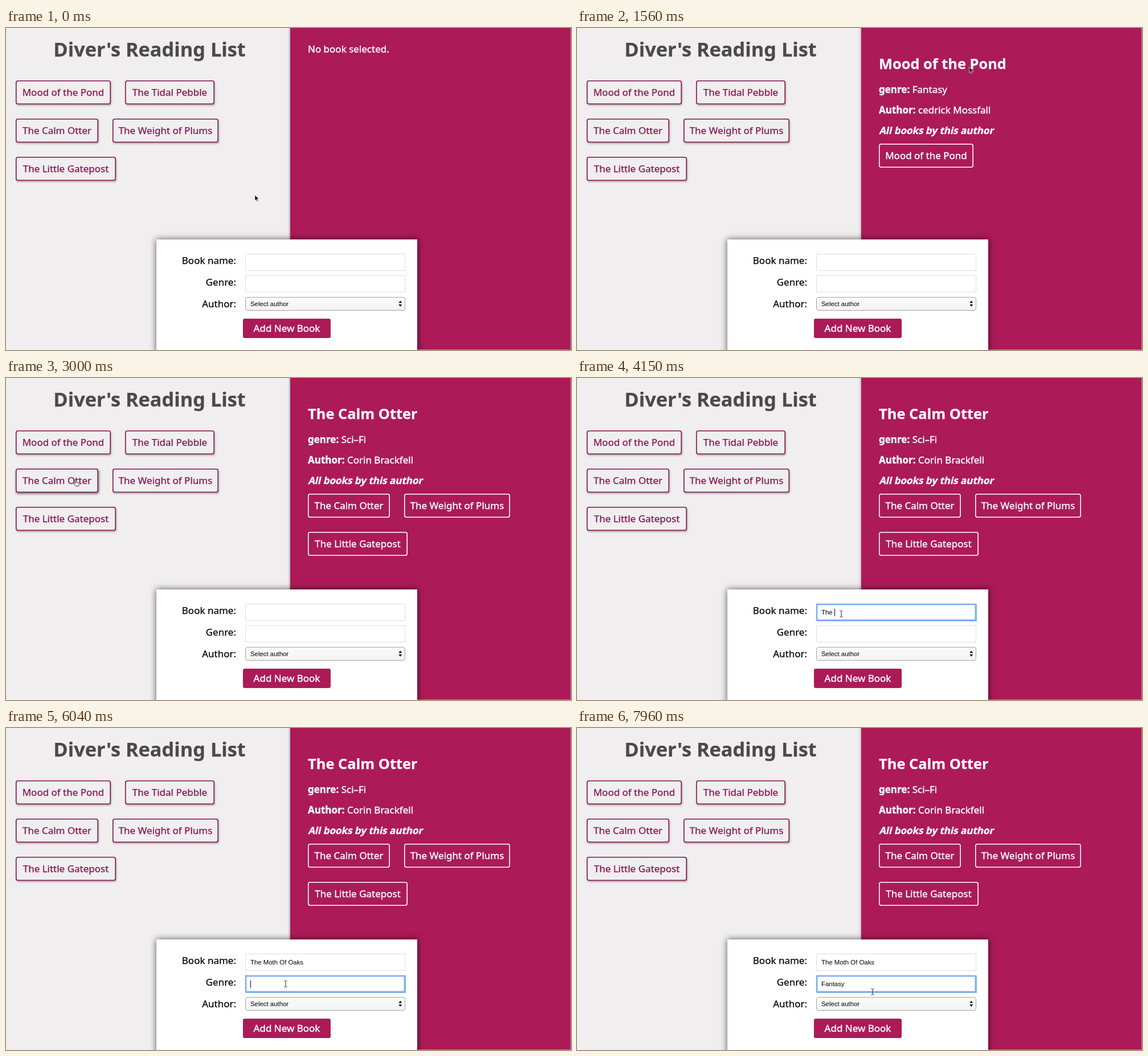
An HTML page for the animation above (8 s loop, 992x565 px).

```html
<!DOCTYPE html>
<html lang="en">
<head>
<meta charset="utf-8">
<title>Reading list</title>
<style>
  html, body { margin: 0; width: 100%; height: 100%; overflow: hidden; }
  body { position: relative; background: #f0eeef; font: 17px/24px "Noto Sans", "Open Sans", sans-serif; color: #000; -webkit-text-stroke: .25px; }
  body * { position: absolute; box-sizing: border-box; white-space: nowrap; margin: 0; }
  b, .value, .caret { position: static !important; }
  h1 { left: 0; width: 504px; top: 17px; font-size: 34.3px; line-height: 40px; text-align: center; color: #4a4a4a; }
  #details { left: 499px; top: 0; width: 493px; height: 565px; background: #ac1a58; color: #fff; box-shadow: -1px -2px 4px rgba(0,0,0,.3), inset -1px -1px rgba(255,255,255,.4); }
  #details p { left: 31px; }
  h2 { left: 31px; top: 44px; font-size: 25.4px; line-height: 36px; }
  .all { top: 168px; font-weight: bold; transform: skewX(-13deg); transform-origin: 0 18.6px; }
  .book { height: 42px; line-height: 42px; border-radius: 4px; text-align: center; box-shadow: inset 0 0 0 1.6px; }
  #list .book { color: #85124f; box-shadow: inset 0 0 0 1.6px, 1px 2px 3px rgba(0,0,0,.3); }
  #list .book.hover { box-shadow: inset 0 0 0 1.6px, 1px 2px 4px rgba(0,0,0,.6); }
  #form { left: 264px; top: 371px; width: 458px; height: 220px; background: #fff; box-shadow: 0 0 11px rgba(0,0,0,.65); }
  label { right: 318px; }
  .field { left: 156px; width: 281px; height: 30px; padding-left: 8px; border: 1px solid #ddd; font: 11.4px/29px "Liberation Sans", Arial, sans-serif; white-space: pre; -webkit-text-stroke: 0; }
  .field.focus { border-color: #76a9f3; box-shadow: -.5px -.5px 1px 1px #8ab6f7, inset 0 0 0 1.5px #86b4f5; }
  .value { white-space: pre; }
  .caret { display: inline-block; width: 1px; height: 13px; margin-right: -1px; vertical-align: -3px; background: #000; visibility: hidden; }
  #select { top: 101px; height: 24px; line-height: 22px; border-color: #a3a3a3; border-radius: 4px; background: linear-gradient(#fafafa, #f4f4f4); }
  #select svg { left: 268px; top: 5px; }
  #add { left: 152px; top: 139px; width: 154px; height: 34px; line-height: 34px; border-radius: 3px; background: #ac1a58; color: #fff; text-align: center; }
  #details p, #add, #details .book { -webkit-text-stroke-width: .4px; }
  #pointer { left: 0; top: 0; overflow: visible; }
</style>
</head>
<body>
<h1>Diver's Reading List</h1>
<div id="list"></div>
<div id="details"></div>
<div id="form">
  <label style="top:25px">Book name:</label>
  <div class="field" style="top:25px"><span class="value"></span><i class="caret"></i></div>
  <label style="top:63px">Genre:</label>
  <div class="field" style="top:63px"><span class="value"></span><i class="caret"></i></div>
  <label style="top:101px">Author:</label>
  <div class="field" id="select">Select author<svg width="7" height="12"><path d="M.4 4.6 3.3.4 6.2 4.6zM.4 6.9 3.3 11.1 6.2 6.9z"/></svg></div>
  <div id="add">Add New Book</div>
</div>
<svg id="pointer" width="1" height="1">
  <path data-kind="arrow" d="M0 0V10L2.3 7.9 3.8 11.4 5.4 10.7 3.9 7.3H7z" stroke="#fff" stroke-width=".7"/>
  <path data-kind="hand" transform="translate(-3.5 .2)" d="M3 7V1.4a1 1 0 0 1 2 0V5l3.5.8q1.2.3 1.2 1.6L9 11.6H4L.8 7.7q0-1.4 1.2-.9z" fill="#fff" stroke="#222" stroke-width=".9"/>
  <path data-kind="beam" d="M-2.5-5.5Q-.4-5.5 0-4.3 .4-5.5 2.5-5.5M0-4.5V4.5M-2.5 5.5Q-.4 5.5 0 4.3 .4 5.5 2.5 5.5" fill="none" stroke="#222"/>
</svg>
<script>
const LOOP = 8000;
const $ = (sel, root = document) => [...root.querySelectorAll(sel)];

const mood = 'Mood of the Pond', otter = 'The Calm Otter',
      plums = 'The Weight of Plums', post = 'The Little Gatepost';

// title, x, y, width
const books = [
  [mood, 17, 92, 167], ['The Tidal Pebble', 209, 92, 157],
  [otter, 17, 159, 145], [plums, 187, 159, 186], [post, 17, 226, 176]
];

const bookBox = ([title, x, y, w]) =>
  `<div class="book" style="left:${x}px;top:${y}px;width:${w}px">${title}</div>`;

const view = (title, genre, author, related) => `<div><h2>${title}</h2>
  <p style="top:96px"><b>genre:</b> ${genre}</p>
  <p style="top:132px"><b>Author:</b> ${author}</p>
  <p class="all">All books by this author</p>${related.map(bookBox).join('')}</div>`;

const listEl = document.getElementById('list');
const detailsEl = document.getElementById('details');
listEl.innerHTML = books.map(bookBox).join('');
detailsEl.innerHTML = '<div><p style="top:25px">No book selected.</p></div>' +
  view(mood, 'Fantasy', 'cedrick Mossfall', [[mood, 31, 203, 166]]) +
  view(otter, 'Sci–Fi', 'Corin Brackfell',
    [[otter, 31, 203, 144], [plums, 200, 203, 186], [post, 31, 270, 175]]);

const items = $('.book', listEl);
const views = [...detailsEl.children];
const pointer = document.getElementById('pointer');
const shapes = $('path', pointer);

// Pointer trips: start, end, then the points passed
const trips = [
  [220, 520, [437, 293], [139, 111]],
  [1220, 2000, [139, 111], [430, 92], [685, 66], [682, 228], [530, 220], [323, 179]],
  [2040, 2520, [323, 179], [122, 178]],
  [3190, 3440, [122, 178], [455, 430], [464, 414]],
  [5780, 6000, [464, 414], [480, 484], [491, 449]],
  [6090, 6260, [491, 449], [531, 333]],
  [7760, 7960, [531, 333], [519, 463]]
];

// Key times per field; caretOff holds the moments when the caret blinks out
const fields = [
  { text: 'The Moth Of Oaks', from: 3400, to: 5980, caretOff: [3670],
    keys: [3890, 3970, 4060, 4150, 4330, 4440, 4550, 4660, 4780, 4930, 5070, 5180, 5300, 5440, 5520, 5590] },
  { text: 'Fantasy', from: 5980, to: LOOP, caretOff: [6480, 7040, 7740],
    keys: [6630, 6720, 6810, 7300, 7370, 7520, 7590] }
];
$('.field').slice(0, 2).forEach((el, i) => {
  fields[i].el = el;
  [fields[i].value, fields[i].caret] = el.children;
});

const smooth = p => p * p * (3 - 2 * p);
const spline = (a, b, c, d, u) =>
  b + u / 2 * (c - a + u * (2 * a - 5 * b + 4 * c - d + u * (3 * (b - c) + d - a)));

function pointerAt(t) {
  const [start, end, ...pts] = trips.filter(trip => t >= trip[0]).pop() || trips[0];
  const p = smooth(Math.min(1, Math.max(0, (t - start) / (end - start))));
  const last = pts.length - 1, s = p * last, i = Math.min(last - 1, Math.floor(s));
  const at = k => pts[Math.min(last, Math.max(0, k))];
  return [0, 1].map(k => spline(at(i - 1)[k], at(i)[k], at(i + 1)[k], at(i + 2)[k], s - i));
}

const inside = (px, py, x, y, w, h) => px >= x && px <= x + w && py >= y && py <= y + h;

function drawPointer(t) {
  const [x, y] = pointerAt(t);
  const over = books.findIndex(([, bx, by, w]) => inside(x, y, bx, by, w, 42));
  items.forEach((el, i) => el.classList.toggle('hover', i === over));
  const inField = inside(x, y, 420, 396, 281, 30) || inside(x, y, 420, 434, 281, 30);
  const kind = over >= 0 ? 'hand' : inField ? 'beam' : 'arrow';
  shapes.forEach(el => el.style.display = el.dataset.kind === kind ? '' : 'none');
  pointer.style.transform = `translate(${x}px, ${y}px)`;
}

function drawField({ text, from, to, keys, caretOff, el, value, caret }, t) {
  const latest = list => Math.max(0, ...list.filter(k => k <= t));
  const focus = t >= from && t < to;
  value.textContent = text.slice(0, keys.filter(k => k <= t).length);
  el.classList.toggle('focus', focus);
  caret.style.visibility = focus && latest([from, ...keys]) > latest(caretOff) ? 'visible' : 'hidden';
}

function draw(t) {
  const shown = t < 1040 ? 0 : t < 3000 ? 1 : 2;
  views.forEach((el, i) => el.style.display = i === shown ? '' : 'none');
  fields.forEach(f => drawField(f, t));
  drawPointer(t);
}

const began = performance.now();
function tick() {
  draw((performance.now() - began) % LOOP);
  requestAnimationFrame(tick);
}
tick();
</script>
</body>
</html>
```
